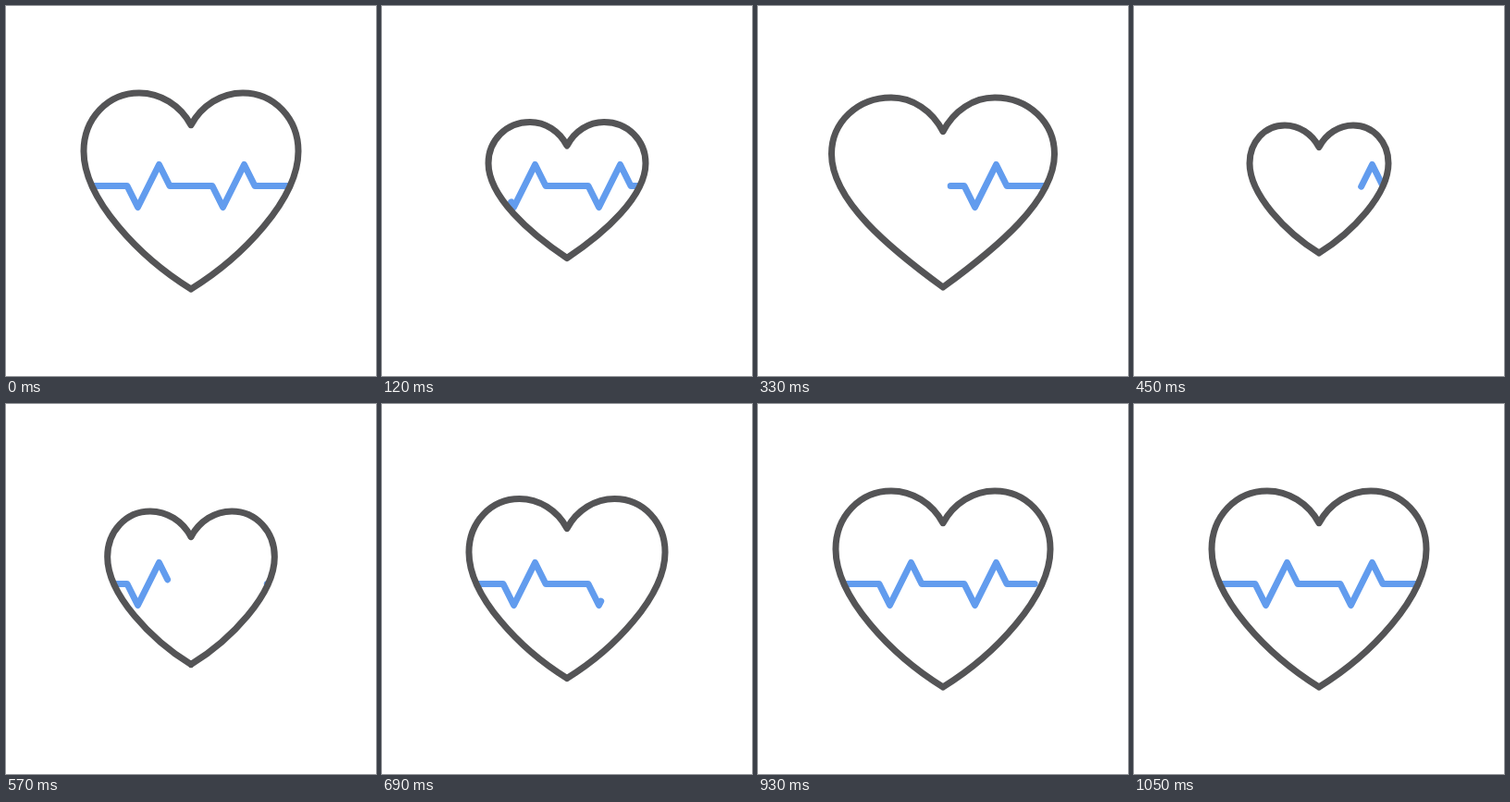
An HTML page that plays this animation: 400 px wide and 400 px high, repeating every 1.29 s.

```html
<!DOCTYPE html>
<html lang="en">
<head>
<meta charset="utf-8">
<title>Heartbeat</title>
<style>
  html, body { margin: 0; width: 100%; height: 100%; overflow: hidden; background: #fff; }
  svg { display: block; width: 100%; height: 100%; }
  path { fill: none; stroke-width: 7; stroke-linecap: round; stroke-linejoin: round; }
  .pulse { stroke: #629cee; }
  .outline { stroke: #545456; }
</style>
</head>
<body>
<svg viewBox="0 0 400 400">
  <clipPath id="inside"><path class="heart"/></clipPath>
  <g clip-path="url(#inside)">
    <path class="pulse" id="leaving" pathLength="1"/>
    <path class="pulse" id="arriving" pathLength="1"/>
  </g>
  <path class="heart outline"/>
</svg>
<script>
const LOOP = 1290, STEP = 30, LAST = 1050;
const MID = 200;

// Heart poses: top, cleft, side and bottom heights, lobe offset, half width, tip fullness
const FULL = [94, 128.7, 157, 306, 56, 116, 0.772];
const KEYS = [
  { at: 0, pose: FULL },
  { at: 120, pose: [125.5, 151, 170, 272.5, 40, 85, 0.74] },
  { at: 330, pose: [99, 135.7, 160, 304, 56, 120.5, 0.71] },
  { at: 450, pose: [129, 152.5, 170, 267, 37, 75, 0.772] },
  { at: 864, pose: FULL, bend: 0.71 },
];

const clamp = x => Math.min(1, Math.max(0, x));
const smooth = u => u * u * (3 - 2 * u);

function poseAt(t) {
  const i = KEYS.findIndex(k => k.at > t);
  if (i < 0) return FULL;
  const from = KEYS[i - 1], to = KEYS[i];
  const v = smooth(((t - from.at) / (to.at - from.at)) ** (to.bend || 1));
  return from.pose.map((a, n) => a + (to.pose[n] - a) * v);
}

function heartPath([top, cleft, side, bottom, lobe, half, tip]) {
  const drop = bottom - side;
  const halfPath = s => {
    const p = (dx, y) => `${MID + s * dx} ${y}`;
    return `M${p(0, cleft)}` +
      `C${p(lobe * 0.21, cleft - (cleft - top) * 0.62)} ${p(lobe * 0.59, top)} ${p(lobe, top)}` +
      `C${p(lobe + (half - lobe) * 0.57, top)} ${p(half, side - (side - top) * 0.556)} ${p(half, side)}` +
      `C${p(half, side + drop * 0.35)} ${p(half * 0.475, side + drop * tip)} ${p(0, bottom)}`;
  };
  return halfPath(-1) + halfPath(1);
}

function showPart(line, start, end) {
  line.style.display = end > start ? '' : 'none';
  line.setAttribute('stroke-dasharray', `${end - start} 9`);
  line.setAttribute('stroke-dashoffset', -start);
}

const leaving = document.getElementById('leaving');
const arriving = document.getElementById('arriving');
const hearts = document.querySelectorAll('.heart');

const beat = 'h46l11.5 23 23-46 11.5 23';
for (const line of [leaving, arriving]) line.setAttribute('d', `M85 194.5${beat}${beat}h46`);

function draw(now) {
  const t = Math.min(LAST, Math.floor((now % LOOP) / STEP) * STEP);
  const d = heartPath(poseAt(t));
  for (const heart of hearts) heart.setAttribute('d', d);
  showPart(leaving, clamp(t / 630), 1);
  showPart(arriving, 0, 1 - (1 - clamp((t - 405) / 645)) ** 1.83);
  requestAnimationFrame(draw);
}
draw(performance.now());
</script>
</body>
</html>
```
